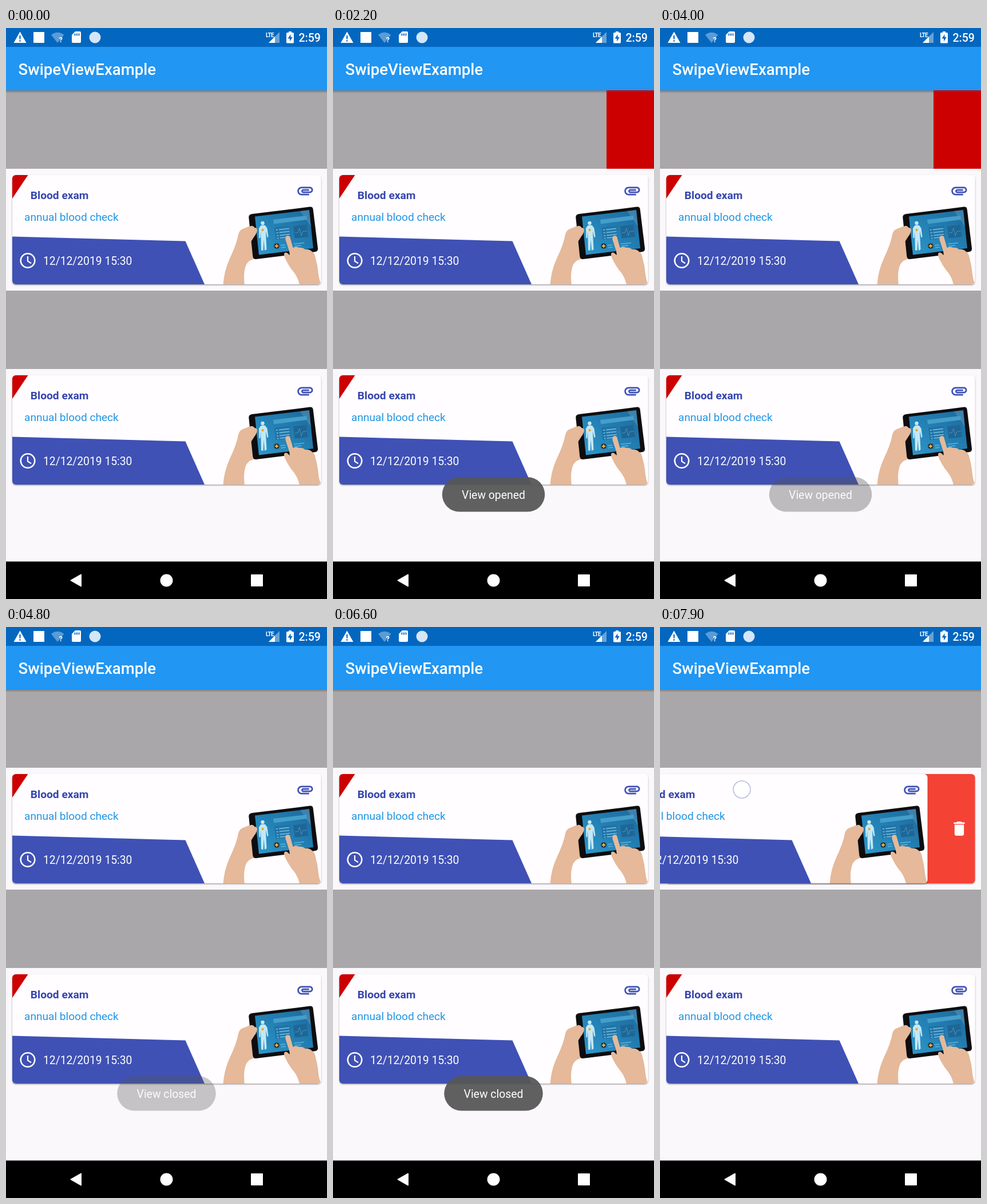
Write an HTML page that moves like this. It is 561x998 px and loops after 8 s.

```html
<!DOCTYPE html>
<html lang="en">
<head>
<meta charset="utf-8">
<title>Swipe view</title>
<style>
  html, body { margin: 0; width: 100%; height: 100%; overflow: hidden; background: #faf8fb; }
  svg { display: block; width: 561px; height: 998px; font-family: Roboto, sans-serif; }
</style>
</head>
<body>
<svg viewBox="0 0 561 998">
  <defs>
    <linearGradient id="glass" x1="0" y1="1" x2="1" y2="0">
      <stop offset="0" stop-color="#2f97ca"/>
      <stop offset=".5" stop-color="#2380b4"/>
      <stop offset="1" stop-color="#1c689b"/>
    </linearGradient>
    <linearGradient id="shade" x1="0" y1="0" x2="0" y2="1">
      <stop offset="0" stop-opacity=".28"/>
      <stop offset="1" stop-opacity="0"/>
    </linearGradient>
    <filter id="lift" x="-5%" y="-5%" width="110%" height="115%">
      <feDropShadow dx="0" dy="1.2" stdDeviation="1" flood-opacity=".42"/>
    </filter>
    <filter id="glow" x="-40%" y="-40%" width="180%" height="180%">
      <feDropShadow dx="0" dy="0" stdDeviation="1.6" flood-color="#fff" flood-opacity=".6"/>
    </filter>
    <clipPath id="round"><rect x="11" y="257" width="539.5" height="191" rx="6"/></clipPath>

    <g id="tablet">
      <path d="M430 325 L531 312.600 Q536 312 536.700 317 L545 385 Q545.600 390.500 540 391.300 L437 404 Q432 404.500 431.300 399 L424.300 331 Q424 326 430 325Z" fill="#0d0d10"/>
      <path d="M435 329.500 L530 318 L537 385 L442 396.500Z" fill="url(#glass)"/>
      <path d="M514 320 L530 318 L533 347Z" fill="#fff" opacity=".14"/>
      <g fill="#c3e8f6">
        <circle cx="448.500" cy="341" r="3.200"/>
        <path d="M445 345.500 Q449 344 453 345 L456.500 350 L458.500 365 L456.500 366 L454 355 L454.500 367 L455.500 387 L452 389 L450.500 370 L449.500 389 L446 388.500 L445.500 368 L445 355 L444.500 367 L442.300 367 L442 350Z"/>
      </g>
      <circle cx="448.500" cy="353" r="2.200" fill="#f0a52b"/>
      <path d="M467 335 L525 328 L526 335 L468 342.500Z" fill="#459dca"/>
      <path d="M469 348.500 L496 345.500 L498.500 367 L471.500 370Z" fill="#2272a5"/>
      <path d="M502 346.500 L525 343.500 L528 365 L504.500 367.500Z" fill="#1f6696"/>
      <path d="M505 358 L510 357.500 L513 350 L516 363 L519 355.500 L526 354.800" fill="none" stroke="#4a9fc6" stroke-width=".8"/>
      <path d="M472 353 L495 350.500 M472.600 358 L495.600 355.500 M473.200 363 L496.200 360.500 M473.800 367.500 L496.800 365" stroke="#62b3da" stroke-width="2" stroke-dasharray="3 2 20"/>
      <path d="M480 380 L488 379 M503 377.500 L521 375.500 M481 384 L489 383 M504 381.500 L516 380" stroke="#62b3da" stroke-width="1.600"/>
      <circle cx="473" cy="381" r="4.800" fill="#27343e"/>
      <path d="M470 381h6m-3 -3v6" stroke="#f4b73c" stroke-width="1.800"/>
    </g>

    <g id="card">
      <rect x="11" y="257" width="539.500" height="191" rx="6" fill="#fffdff" filter="url(#lift)"/>
      <g clip-path="url(#round)">
        <path d="M11 257H38.500L11 298Z" fill="#c00"/>
        <path d="M11 364.400L313.500 372.500L347 448H11Z" fill="#3f51b5"/>
        <g fill="#e5b99a">
          <path d="M379.500 449 Q381 425 391 403 Q403 378 406 361 Q407.500 354 413 351.500 L427 346 L436 403 Q425 405 420 413 Q414 427 417 449Z"/>
          <use href="#tablet"/>
          <path d="M422 348 L429 345.800 Q433 346 434.500 349 Q440 349.500 438.800 355 Q437 361 433.500 365 L427.800 374Z"/>
          <path d="M488.500 370 Q487.500 363.500 492.500 363 Q496 363 497 368 L501.500 384 Q507 381 512 384 Q518 383 523 387 Q530 386 535 391 Q540 394 541 402 Q545 416 546 430 Q547 440 551 449 H513 Q511 438 504 428 Q496 419 490 407 Q484 396 487 393 Q491 391 496 398 L495 390Z"/>
        </g>
      </g>
      <text x="42.800" y="299.300" font-size="19.200" font-weight="700" fill="#3545ad">Blood exam</text>
      <text x="32" y="337" font-size="19.100" fill="#2196e3">annual blood check</text>
      <text x="65" y="414" font-size="19.300" fill="#fff">12/12/2019 15:30</text>
      <g fill="none" stroke="#fff" stroke-width="2.600">
        <circle cx="38" cy="406.500" r="12.300"/>
        <path d="M38 399V407.500L44 411.200" stroke-width="2.200"/>
      </g>
      <path transform="translate(506.500 268) scale(1.365)" fill="#3f51b5" d="M2 12.500C2 9.460 4.460 7 7.500 7H18c2.210 0 4 1.790 4 4s-1.790 4-4 4H9.500C8.120 15 7 13.880 7 12.500S8.120 10 9.500 10H17v2H9.410c-.55 0-.55 1 0 1H18c1.100 0 2-.9 2-2s-.9-2-2-2H7.500C5.570 9 4 10.570 4 12.500S5.570 16 7.500 16H17v2H7.500C4.460 18 2 15.540 2 12.500z"/>
    </g>
  </defs>

  <rect width="561" height="998" fill="#faf8fb"/>
  <path d="M0 109H561V246H0ZM0 459H561V596H0Z" fill="#a9a7a9"/>
  <rect y="109" width="561" height="5" fill="url(#shade)"/>
  <rect id="panel" y="109" height="137" fill="#c00"/>

  <g id="trash">
    <rect x="11" y="257" width="539.500" height="191" rx="6" fill="#f44336" filter="url(#lift)"/>
    <path transform="translate(506.600 336) scale(1.365)" fill="#fff" d="M6 19c0 1.100.9 2 2 2h8c1.100 0 2-.9 2-2V7H6v12zM19 4h-3.500l-1-1h-5l-1 1H5v2h14V4z"/>
  </g>
  <use id="top" href="#card"/>
  <use href="#card" y="350"/>

  <rect width="561" height="33" fill="#0467bf"/>
  <rect y="33" width="561" height="76" fill="#2196f3"/>
  <text x="21.500" y="81.500" font-size="27.600" font-weight="500" fill="#fff">SwipeViewExample</text>

  <g fill="#fff">
    <path d="M24.500 6.500L35.500 26H13.500Z"/>
    <path d="M24.500 13v6.500m0 1.800v2.500" stroke="#0467bf" stroke-width="2.200"/>
    <rect x="48" y="7" width="19" height="19"/>
    <path d="M79 12Q90 3.500 101.500 12L90 26Z" opacity=".35"/>
    <text x="92.500" y="25" font-size="13" font-weight="700">?</text>
    <path d="M121 6H129Q131 6 131 8V24Q131 26 129 26H117Q115 26 115 24V12Z"/>
    <path d="M120.500 9.500v4m3.500 -4v4m3.500 -4v4" stroke="#0467bf" stroke-width="1.800"/>
    <circle cx="155.500" cy="16.500" r="10" fill="#d5e6f6"/>
    <path d="M478 7V26H459Z" opacity=".4"/>
    <path d="M470 15V26H459Z"/>
    <text x="454" y="15.500" font-size="10" font-weight="700" letter-spacing="-.8">LTE</text>
    <path d="M494 6H499V8H501.500Q503 8 503 9.500V25Q503 26.500 501.500 26.500H491.500Q490 26.500 490 25V9.500Q490 8 491.500 8H494Z"/>
    <path d="M497.500 11L492.500 18.500H496V23.500L500.800 16H497.500Z" fill="#0467bf"/>
    <text x="511.500" y="24" font-size="19.500" font-weight="500">2:59</text>
  </g>

  <rect y="932.500" width="561" height="66" fill="#000"/>
  <g fill="#fff" stroke="#fff" stroke-width="2" stroke-linejoin="round">
    <path d="M113.500 965.500L131 955.500V975.500Z"/>
    <circle cx="280.500" cy="965.500" r="10"/>
    <rect x="429" y="956" width="19" height="19"/>
  </g>

  <circle id="touch" r="15" fill="#fff" fill-opacity=".62" stroke="#8f9dd6" stroke-width="1.500" filter="url(#glow)"/>
  <g id="toast">
    <rect id="pill" y="785" height="60.500" rx="30.250" fill="#575757" fill-opacity=".94"/>
    <text id="note" x="280.500" y="823" font-size="19.400" text-anchor="middle" fill="#fff"></text>
  </g>
</svg>
<script>
const LOOP = 8000, TICK = 100;
const el = id => document.getElementById(id);
const set = (id, attrs) => {
  for (const k in attrs) el(id).setAttribute(k, attrs[k]);
};

// Key tables: [time, value]
const panelWidth = [[1200, 0], [1300, 30], [1400, 65.5], [1500, 79], [1600, 83],
  [4200, 83], [4300, 45], [4400, 2], [4500, 0]];
const cardShift = [[7700, 0], [7800, -42], [7900, -83]];

const swipes = [
  { y: 188, x: [[1100, 385], [1200, 370], [1400, 304], [1500, 290]],
    a: [[900, 0], [1000, .6], [1100, 1], [1500, 1], [1600, .4], [1700, 0]] },
  { y: 188, x: [[4200, 300], [4300, 340], [4400, 383], [4500, 395]],
    a: [[4000, 0], [4100, .6], [4200, 1], [4400, 1], [4500, .4], [4600, 0]] },
  { y: 284, x: [[7800, 184], [7900, 143]],
    a: [[7700, 0], [7800, 1], [7900, .7]] }
];
const toasts = [
  { text: "View opened", width: 179.5, show: 1670, hide: 3610 },
  { text: "View closed", width: 172.5, show: 4705, hide: 6585 }
];
const FADE = 500;

function sample(keys, t) {
  if (t <= keys[0][0]) return keys[0][1];
  for (let i = 1; i < keys.length; i++) {
    const [t0, v0] = keys[i - 1], [t1, v1] = keys[i];
    if (t <= t1) return v0 + (v1 - v0) * (t - t0) / (t1 - t0);
  }
  return keys[keys.length - 1][1];
}

const unit = v => Math.min(1, Math.max(0, v));

// Decelerating fade in, accelerating fade out
function toastAlpha({ show, hide }, t) {
  return t < hide ? 1 - (1 - unit((t - show) / FADE)) ** 2
                  : 1 - unit((t - hide) / FADE) ** 2;
}

function draw(t) {
  const w = sample(panelWidth, t), dx = sample(cardShift, t);
  set("panel", { x: 561 - w, width: w });
  set("top", { x: dx });
  set("trash", { visibility: dx ? "visible" : "hidden" });

  const swipe = swipes.find(s => sample(s.a, t) > 0);
  set("touch", swipe
    ? { cx: sample(swipe.x, t), cy: swipe.y, opacity: sample(swipe.a, t) }
    : { opacity: 0 });

  const toast = toasts[t < 4500 ? 0 : 1];
  set("toast", { opacity: toastAlpha(toast, t) });
  set("pill", { x: 280.5 - toast.width / 2, width: toast.width });
  el("note").textContent = toast.text;
}

const start = performance.now();
function frame() {
  const t = (performance.now() - start) % LOOP;
  draw(Math.floor(t / TICK) * TICK);
  requestAnimationFrame(frame);
}
frame();
</script>
</body>
</html>
```
